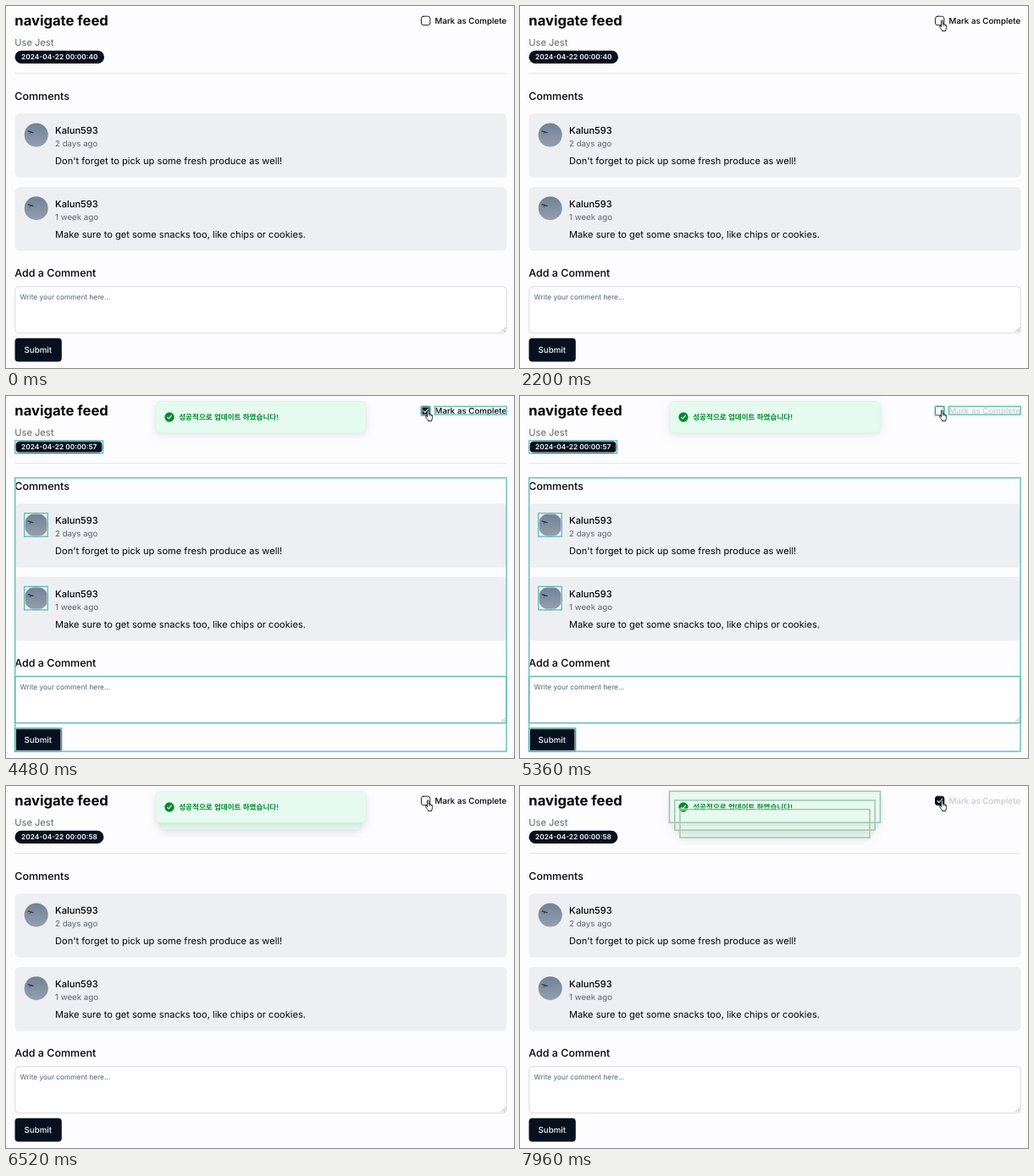
An HTML page with a canvas for the animation above (8 s loop, 600 by 428 pixels).

```html
<!DOCTYPE html>
<html lang="en">
<head>
<meta charset="utf-8">
<title>Task page</title>
<style>
  html, body { margin: 0; width: 100%; height: 100%; overflow: hidden; background: #fdfcfe; }
  canvas { display: block; width: 600px; height: 428px; }
</style>
</head>
<body>
<canvas id="stage"></canvas>
<script>
const W = 600, H = 428, LOOP = 8000;
const canvas = document.getElementById('stage');
const ctx = canvas.getContext('2d');
const dpr = Math.max(1, window.devicePixelRatio || 1);
canvas.width = W * dpr;
canvas.height = H * dpr;
ctx.textRendering = 'geometricPrecision';

const PAGE = '#fdfcfe', DARK = '#07101e', INK = '#020408', GREY = '#5f646c', GREEN = '#008a2e';
const TEAL = '#37afa9', SAGE = '#80b393';
const FONT = 'Inter, "Noto Sans CJK KR", "Noto Sans CJK", "Open Sans", sans-serif';

// Timeline in ms
const FLASH = 250;
const CLICKS = [3320, 5130, 6880];
const REFETCHES = [4340, 6190];
const TOASTS = [3935, 5748, 7400];
const TOAST_GONE = 7940;
const STAMPS = ['2024-04-22 00:00:40', '2024-04-22 00:00:57', '2024-04-22 00:00:58'];

const clamp = v => Math.min(1, Math.max(0, v));
const count = (times, t) => times.filter(s => t >= s).length;
const lit = (t, start, length = FLASH) => t >= start && t < start + length;

// CSS "ease": cubic-bezier(.25, .1, .25, 1)
function ease(x) {
  x = clamp(x);
  if (x === 0 || x === 1) return x;
  const bez = (u, a, b) => 3 * u * (1 - u) ** 2 * a + 3 * u * u * (1 - u) * b + u ** 3;
  let lo = 0, hi = 1;
  for (let i = 0; i < 24; i++) {
    const mid = (lo + hi) / 2;
    if (bez(mid, .25, .25) < x) lo = mid; else hi = mid;
  }
  return bez(lo, .1, 1);
}

function text(str, x, y, size, weight = 400, color = INK) {
  ctx.font = `${weight} ${size}px ${FONT}`;
  ctx.fillStyle = color;
  ctx.fillText(str, x, y);
}

function box(x, y, w, h, r, fill, stroke, line = 1) {
  ctx.beginPath();
  ctx.roundRect(x, y, w, h, r);
  if (fill) { ctx.fillStyle = fill; ctx.fill(); }
  if (stroke) { ctx.strokeStyle = stroke; ctx.lineWidth = line; ctx.stroke(); }
}

function polyline(points, color, line) {
  ctx.beginPath();
  points.forEach(([x, y]) => ctx.lineTo(x, y));
  ctx.strokeStyle = color;
  ctx.lineWidth = line;
  ctx.lineCap = ctx.lineJoin = 'round';
  ctx.stroke();
}

function avatar(cx, cy) {
  const g = ctx.createLinearGradient(0, cy - 14, 0, cy + 14);
  g.addColorStop(0, '#718196');
  g.addColorStop(1, '#94a0af');
  ctx.beginPath();
  ctx.arc(cx, cy, 14, 0, Math.PI * 2);
  ctx.fillStyle = g;
  ctx.fill();
  polyline([[cx - 9.6, cy - 4.6], [cx - 3.6, cy - 2.8]], '#2c3542', 1.2);
  polyline([[cx - 6, cy - 3.6], [cx - 7.6, cy - 1.6]], '#2c3542', 1);
}

function comment(y, age, body) {
  box(10.5, y, 581, 75.5, 5.5, '#edeff2');
  avatar(35.7, y + 25.2);
  text('Kalun593', 58, y + 23.8, 11.1, 500);
  text(age, 58, y + 38.6, 9.7, 400, GREY);
  text(body, 58, y + 59.9, 11.1);
}

function checkbox(checked) {
  box(490.5, 12.2, 10.4, 10.4, 2.6, checked ? DARK : PAGE, DARK, .9);
  if (checked) polyline([[493, 17.6], [494.9, 19.5], [498.6, 15.4]], '#fff', 1.1);
}

function pillWidth(stamp) {
  ctx.font = `600 8.3px ${FONT}`;
  return ctx.measureText(stamp).width + 15.2;
}

function page(t) {
  const stamp = STAMPS[count(REFETCHES, t)];
  const clicks = count(CLICKS, t);
  const pending = clicks > count(REFETCHES, t);

  text('navigate feed', 10.3, 23, 16.6, 700);
  text('Use Jest', 10.3, 46.6, 11.1, 400, GREY);
  box(10.5, 52.8, pillWidth(stamp), 15.3, 7.65, DARK);
  text(stamp, 18.1, 63.4, 8.3, 600, '#f8fafc');
  ctx.fillStyle = '#e6e6eb';
  ctx.fillRect(10.5, 79, 581, 1);

  checkbox(clicks % 2 === 1);
  text('Mark as Complete', 506.5, 21, 9.75, 500, pending ? '#c8cacd' : INK);

  text('Comments', 10.3, 111, 12.5, 500);
  comment(127.3, '2 days ago', "Don't forget to pick up some fresh produce as well!");
  comment(214, '1 week ago', 'Make sure to get some snacks too, like chips or cookies.');

  text('Add a Comment', 10.3, 320.4, 12.5, 500);
  box(10.8, 331.8, 580.4, 54.9, 4, '#fefdff', '#d9dce0');
  text('Write your comment here...', 16.6, 347.4, 8.3, 400, '#55637a');
  polyline([[585.5, 385], [590, 380.5]], '#8a8a8f', .7);
  polyline([[588, 385], [590, 383]], '#8a8a8f', .7);
  box(10.5, 392.8, 55.3, 27.8, 4, DARK);
  text('Submit', 21.6, 410.4, 9.7, 500, '#f8fafc');
}

// Toast stack: newer toasts push older ones back and shrink them
function toastPose(i, t) {
  const enter = ease((t - TOASTS[i]) / 400);
  const depth = TOASTS.slice(i + 1).reduce((d, s) => d + ease((t - s) / 400), 0);
  const scale = 1 - .05 * depth;
  const w = 249 * scale, h = 37 * scale;
  const cy = 24.7 - 37 * (1 - enter) + 9.8 * depth;
  return { enter, depth, scale, cy, rect: [301 - w / 2, cy - h / 2, w, h] };
}

function toast(i, t) {
  const { enter, depth, scale, cy } = toastPose(i, t);
  const leave = i === 0 ? clamp((t - TOAST_GONE) / 200) : 0;
  const alpha = enter * (1 - leave);
  ctx.save();
  ctx.translate(301, cy);
  ctx.scale(scale, scale);
  ctx.globalAlpha = alpha;
  ctx.save();
  ctx.shadowColor = 'rgba(0,0,0,.1)';
  ctx.shadowBlur = 8.4 * dpr;
  ctx.shadowOffsetY = 2.8 * dpr;
  box(-124.5, -18.5, 249, 37, 5.6, '#e6fbef');
  ctx.restore();
  box(-124.2, -18.2, 248.4, 36.4, 5.4, null, '#d2f8e1', .7);
  ctx.globalAlpha = alpha * (1 - clamp(depth));
  ctx.beginPath();
  ctx.arc(-108, .3, 5.7, 0, Math.PI * 2);
  ctx.fillStyle = GREEN;
  ctx.fill();
  polyline([[-110.4, .6], [-108.8, 2.2], [-105.6, -1.6]], '#e6fbef', 1.1);
  text('성공적으로 업데이트 하였습니다!', -96.8, 3.4, 8.6, 600, GREEN);
  ctx.restore();
}

function outline([x, y, w, h], color) {
  const ring = (d, stroke, line) => {
    ctx.strokeStyle = stroke;
    ctx.lineWidth = line;
    ctx.strokeRect(x + d, y + d, w - 2 * d, h - 2 * d);
  };
  ctx.save();
  ctx.lineJoin = 'miter';
  ring(-.9, '#f0f0f0', .7);
  ring(.9, '#f0f0f0', .7);
  ctx.globalAlpha = .75;
  ring(0, color, 1.4);
  ctx.restore();
}

function highlights(t) {
  const check = [490.4, 12.2, 10.6, 10.6];
  if ([...CLICKS, ...REFETCHES].some(s => lit(t, s))) {
    const pill = pillWidth(STAMPS[count(REFETCHES, t)]);
    [
      [10.7, 52.9, pill - .6, 14.8], [506.6, 12.4, 84.6, 9.6],
      [10.7, 96.8, 580.4, 323.4],
      [21.7, 138.6, 27.6, 27.6], [21.7, 225.3, 27.6, 27.6],
      [10.7, 331.6, 580.4, 55], [10.7, 392.8, 55, 27.4]
    ].forEach(r => outline(r, TEAL));
  }
  if (CLICKS.some(s => lit(t, s, 300)) || REFETCHES.some(s => lit(t, s))) outline(check, TEAL);

  [...TOASTS, TOAST_GONE].forEach(s => {
    if (!lit(t, s)) return;
    for (let i = 0; i < count(TOASTS, s); i++) outline(toastPose(i, s).rect, SAGE);
  });
}

const HAND = new Path2D('M2.6 8.2V1.8Q2.6.7 3.5.7T4.4 1.8V5Q5.9 4.7 6 5.6Q7.3 5.2 7.4 6.2Q8.8 6 8.8 7.2' +
  'V9.4Q8.6 11 7.9 12V13.4H3.6V12.2Q2 10.6.7 8.6Q.2 7.4 1.3 7.2Q2 7.4 2.6 8.2Z');
const FINGERS = new Path2D('M4.4 5V7M6 5.6V7.4M7.4 6.2V7.6');
const ARROW = new Path2D('M0 0V10.4L2.5 8.2L4.1 11.8L5.7 11.1L4.2 7.6H7.4Z');
const BEAM = new Path2D('M-2-5Q0-5 0-4Q0-5 2-5M0-4V4M-2 5Q0 5 0 4Q0 5 2 5');

function cursor(t) {
  if (t < 720) return;
  const p = clamp((t - 700) / 780);
  const k = p * p * (3 - 2 * p);
  const settle = clamp((t - 1640) / 160);
  const x = 551 - 52.6 * k;
  const y = 392 - 373.8 * k - 1.6 * settle;
  ctx.save();
  ctx.translate(x, y);
  ctx.lineJoin = 'round';
  ctx.strokeStyle = '#111';
  ctx.lineWidth = .9;
  if (y < 23) {
    ctx.translate(-3.5, -.5);
    ctx.fillStyle = '#fff';
    ctx.fill(HAND);
    ctx.stroke(HAND);
    ctx.lineWidth = .6;
    ctx.stroke(FINGERS);
  } else if (y > 332 && y < 387) {
    ctx.stroke(BEAM);
  } else {
    ctx.strokeStyle = '#fff';
    ctx.lineWidth = 1.2;
    ctx.stroke(ARROW);
    ctx.fillStyle = '#111';
    ctx.fill(ARROW);
  }
  ctx.restore();
}

const start = performance.now();

function frame() {
  const t = (performance.now() - start) % LOOP;
  ctx.setTransform(dpr, 0, 0, dpr, 0, 0);
  ctx.fillStyle = PAGE;
  ctx.fillRect(0, 0, W, H);
  page(t);
  TOASTS.forEach((s, i) => { if (t >= s) toast(i, t); });
  highlights(t);
  cursor(t);
  requestAnimationFrame(frame);
}
frame();
</script>
</body>
</html>
```
